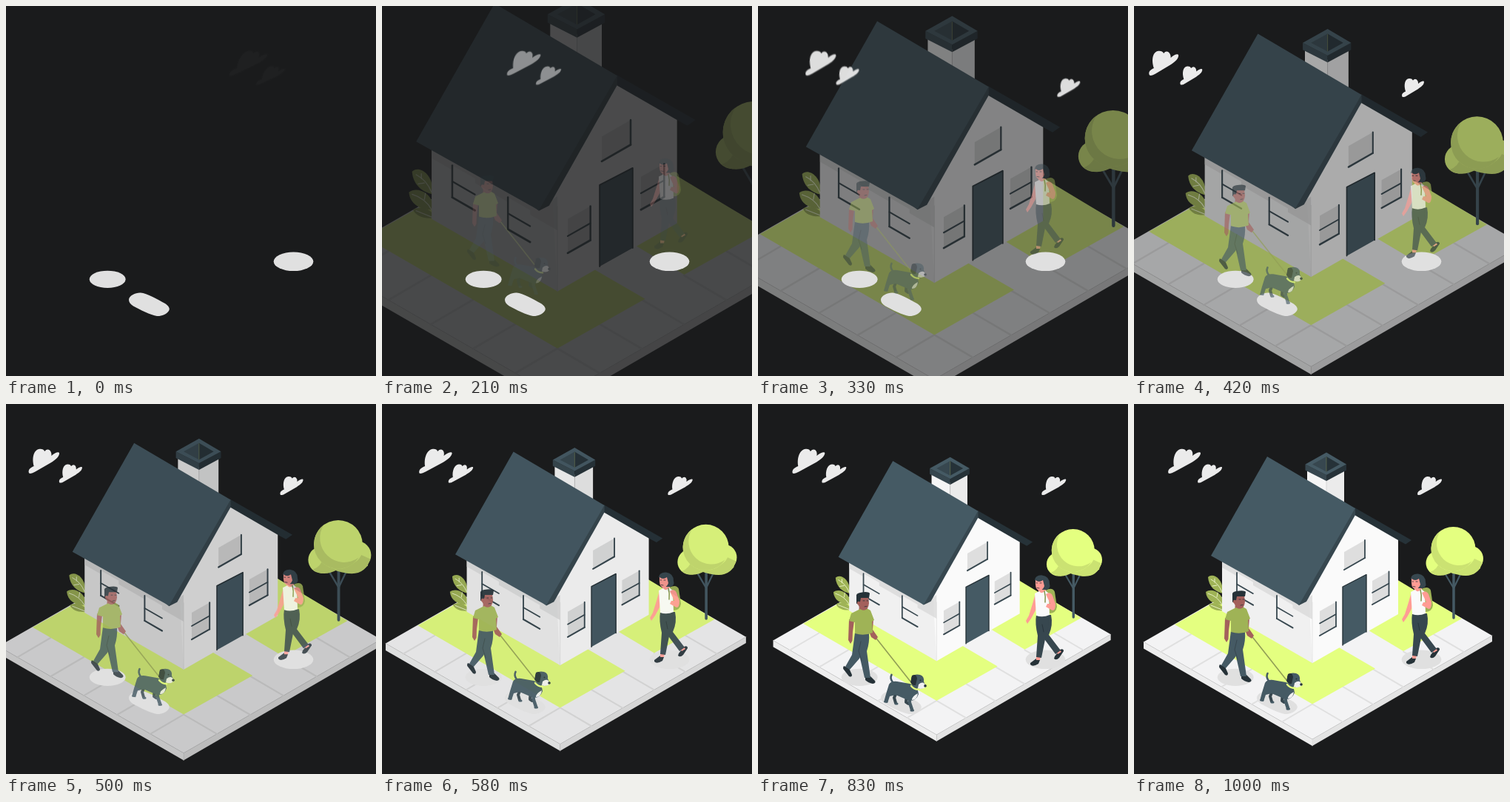
An HTML page for the animation above (1.04 s loop, 500x500 px).

```html
<!DOCTYPE html>
<html lang="en">
<head>
<meta charset="utf-8">
<title>Neighbourhood walk</title>
<style>
html, body { margin: 0; height: 100%; overflow: hidden; background: #1a1b1c; }
svg { display: block; width: 100vw; height: 100vh; }
.slate { fill: #455a64; } .deep { fill: #37474f; } .ink { fill: #263238; }
.lime { fill: #e4ff80; } .shade { fill: #cbe272; } .olive { fill: #9fb356; }
.wall { fill: #fafafa; } .side { fill: #f0f0f0; } .pane { fill: #e0e0e0; }
.tan { fill: #a3605c; } .pink { fill: #ff9c94; }
.line { fill: none; stroke-linecap: round; stroke-linejoin: round; }
</style>
</head>
<body>
<svg viewBox="0 0 500 500">
  <defs>
    <path id="cloud" fill="#ebebeb" d="M.5 33.500C-1 29 3 26 8 24C6 13 10 1.500 18 .8Q23 .3 24.500 4Q28 0 31.500 2.500Q34 5 33 10C38 6 44.500 3.500 44 7C43 12 37 16 31 19.500L9 31.500Q3 35 .5 33.500Z"/>
  </defs>

  <g id="scene">
    <!-- platform -->
    <path fill="#f3f3f4" d="M13 321.500L256 182 484 313 241 453Z"/>
    <path fill="#ededed" d="M13 321.500L241 453V462L13 330.500Z"/>
    <path fill="#e3e3e3" d="M484 313L241 453V462L484 321Z"/>
    <path class="line" stroke="#d8d8d8" stroke-width=".6" d="M13 321.500L241 453 484 313M241 453V462"/>
    <path id="joints" class="line" stroke="#e0e0e0" stroke-width="2"/>
    <path class="lime" d="M55 298L241 405.500 326 357.500 277 329 241 350 119 262Z"/>
    <path class="lime" d="M317 306L364 334 443 290 355 237Z"/>

    <!-- plant -->
    <g class="olive">
      <path d="M120 256C110 254 101 247 100 234C106 228 119 235 120 251Z"/>
      <path d="M120 271C107 271 98 265 97 254C105 248 118 255 120 265Z"/>
      <path d="M120 279C112 280 103 277 101 271C108 266 118 271 120 275Z"/>
    </g>
    <path class="line" stroke="#eef7cf" stroke-width=".9" d="M104 237Q114 242 119 254M100 256Q113 260 119 271M112 261L113 255M109 241V236M112 245L106 246M104 272L119 278"/>

    <!-- tree -->
    <path class="line" stroke="#455a64" stroke-width="3.500" d="M432 228V289"/>
    <path class="line" stroke="#455a64" stroke-width="2.200" d="M419 227L432 249 443 226"/>
    <circle class="lime" cx="411" cy="215" r="16.500"/>
    <path class="shade" d="M400 227Q410 224 414 211L432 226Q414 237 400 227Z"/>
    <path class="shade" d="M415 215L463 208Q470 214 468 222Q454 238 425 227Z"/>
    <circle class="lime" cx="455" cy="209" r="17"/>
    <path class="shade" d="M421 222Q452 226 460 209L471 214Q464 236 440 231Z"/>
    <circle class="lime" cx="431.500" cy="196" r="30"/>
    <path class="shade" d="M413.700 171.800A30 30 0 1 0 456.700 212.200A30 30 0 0 1 413.700 171.800Z"/>

    <!-- chimney -->
    <path fill="#f5f5f5" d="M234 87L260 101V122L234 107Z"/>
    <path fill="#ebebeb" d="M260 101L284 87V136L260 122Z"/>
    <path class="line" stroke="#c8c8c8" stroke-width=".6" d="M260 104V119"/>
    <path class="deep" d="M231.500 81.500L260 96V104L231.500 89.500Z"/>
    <path class="ink" d="M287 81.500L260 96V104L287 89.500Z"/>
    <path class="slate" d="M260 65.500L287 81.500 260 96 231.500 81.500Z"/>
    <path class="deep" d="M260 71L241 81.500 260 91.500Z"/>
    <path class="ink" d="M260 71L278 81.500 260 91.500Z"/>
    <path class="line" stroke="#7d8a55" stroke-width=".5" d="M260 72V91"/>

    <!-- house -->
    <path class="side" d="M119 206L241 262V350L119 280Z"/>
    <path class="wall" d="M241 350L357 284V180L299 145 236 255Z"/>
    <path fill="#d9d9d9" opacity=".75" d="M119 208L225 268 241 258V291L119 221Z"/>
    <g id="windows"></g>
    <path class="line" stroke="#d8d8d8" stroke-width=".6" d="M241 268V350"/>
    <path class="slate" d="M282 247L314 230V308L282 326Z"/>
    <path class="line" stroke="#263238" stroke-width="1.400" d="M282 326V247L314 230.500V308"/>
    <path class="ink" d="M298 140L375 184 367 189.500 357 184 298 150Z"/>
    <path class="deep" d="M299 141V150L233 267 223 272 218 268Z"/>
    <path class="slate" d="M180 71L299 141 223 271.500 104 205Z"/>
  </g>

  <!-- shadows -->
  <g class="pane">
    <ellipse cx="137.200" cy="369.300" rx="24.400" ry="11.600"/>
    <ellipse cx="388.500" cy="345.300" rx="26.800" ry="12.800"/>
    <path d="M166 397C166 391 176 387 182 387.500C190 388 206 397 214 401.500C220 405 222 409 220 412C217 417 209 419.500 204 419C196 418 180 410 172 405.500C168 403 166 400 166 397Z"/>
  </g>

  <g id="walkers">
    <path class="line" stroke="#919e55" stroke-width="1.600" d="M157 311L206 373"/>

    <!-- man -->
    <path class="tan" d="M137 268H147L148 281 136 282Z"/>
    <path class="tan" d="M123 289L130 291 128 306 127.500 318 125 322 122 317Z"/>
    <path class="tan" d="M149 287L156 288 155 303 162 313 159 317 153 313 149 303Z"/>
    <path class="ink" d="M116 352Q114 355 116 357L123 366Q127 368 127 364L123 355Z"/>
    <path class="ink" d="M145 366L152 366 158 372Q160 375 155 376 149 375 145 371Z"/>
    <path class="slate" d="M131 307L150 306 146 326 137 342 124 357 118 353 127 337Z"/>
    <path class="slate" d="M134 308H150Q151 320 147 332L152 368 144 368 136 333Z"/>
    <path class="line" stroke="#37474f" d="M139 319L136 332 140 345"/>
    <path class="olive" d="M132 278L138 275Q143 279 147 274L152 277 157 290 154 292 155 307Q143 312 131 308V293L123 291 126 281Z"/>
    <path class="tan" d="M135 260Q142 255 149 259L150 267Q149 276 144 276.500 138 275 135 269Z"/>
    <path class="ink" d="M133 268L133 258Q132 254 138 253 149 251 151 254L150 260 139 260 138 265Z"/>
    <circle class="tan" cx="136" cy="267" r="2.200"/>
    <path class="line" stroke="#263238" stroke-width=".8" d="M142 264H144M147 264H149M144 272L147 271.500"/>

    <!-- dog -->
    <path class="line" stroke="#37474f" stroke-width="4" d="M187 388L184 395 186 402M201 389L200 401 203 403"/>
    <path class="line" stroke="#455a64" stroke-width="2.600" d="M182 374Q178 369 180.500 364"/>
    <path class="slate" d="M177 377Q180 372 188 373L205 376 215 380 217 390Q214 399 205 399Q195 395 186 391L178 393 175 402 170 401 173 390Z"/>
    <path class="line" stroke="#455a64" stroke-width="4.500" d="M204 394L205 402 208 411"/>
    <path class="line" stroke="#455a64" stroke-width="3" d="M207 412H209.500M172 400H174M186 403H188"/>
    <path fill="#f0f0f0" d="M216 389Q215 398 208 398Q208 393 216 389Z"/>
    <path class="slate" d="M207 368Q211 362 219 364Q225 366 224 373L226 378 221 383 211 381Z"/>
    <path fill="#f0f0f0" d="M217 377Q222 373 225 376L227 380Q222 385 216 382Z"/>
    <path class="ink" d="M208 365Q214 362 215 369L213 378Q208 379 206 374Z"/>
    <circle class="ink" cx="226" cy="379" r="1.800"/>
    <circle class="ink" cx="219.500" cy="371.500" r="1"/>
    <path class="line" stroke="#e4ff80" stroke-width="2.400" d="M207 379Q211 384 217 384"/>

    <!-- woman -->
    <path class="pink" d="M375 254L379 261 375 277 369 288 364 295 362 291 366 284 371 268Z"/>
    <path class="ink" d="M368 348L376 342 381 344 379 349Q371 354 368 350Z"/>
    <path class="ink" d="M401 339L408 330Q413 328 413 332L407 341Q403 345 400 342Z"/>
    <path class="pink" d="M376 339H382L381 344H376ZM403 332L407 329 410 333 405 336Z"/>
    <path class="deep" d="M383 283H396Q399 297 393 310L409 331 402 336 385 313Z"/>
    <path class="deep" d="M376 283H392Q394 298 389 311L383 341 376 340 378 311Q374 295 376 283Z"/>
    <path class="line" stroke="#263238" stroke-width=".8" d="M384 296L386 306"/>
    <path class="olive" d="M388 250Q398 245 401 252L404 272Q403 281 393 281Z"/>
    <path class="pink" d="M379 244H388L390 256H379Z"/>
    <path class="wall" d="M374 254L380 251Q384 256 388 250L393 254 394 283Q385 287 376 284Z"/>
    <path class="pink" d="M389 255Q395 251 398 257L402 268Q402 277 398 277L389 272 391 268 395 268Z"/>
    <path class="line" stroke="#82934a" stroke-width="1.500" d="M387 251Q389 258 388 266"/>
    <path class="deep" d="M374 236Q375 229 384 229.500Q394 231 394 241Q396 247 390 249H384Z"/>
    <path class="pink" d="M375 236Q380 240 385 236L387 244Q385 250 379 250Q374 248 375 236Z"/>
    <path class="line" stroke="#263238" stroke-width=".8" d="M376 240H377.500M381 240H383M377 246.500L380 247"/>
  </g>

  <g id="clouds">
    <use href="#cloud" x="46" y="60"/>
    <use href="#cloud" transform="translate(86 81) scale(.75)"/>
    <use href="#cloud" transform="translate(383 97.500) scale(.75)"/>
  </g>
</svg>
<script>
const $ = id => document.getElementById(id);

// Pavement joints run outwards from the lawn edges.
let joints = '';
for (let i = 0; i < 5; i++) {
  for (const dir of [-1, 1]) {
    joints += `M${241 + dir * 41 * i} ${405.5 - 23.6 * i}l${dir * 41} 24`;
  }
}
$('joints').setAttribute('d', joints);

// Window: top-left corner, width, rise, height, x of the framed side, crossbar.
function addWindow(x, y, w, rise, h, frame, bar) {
  const sill = (dy, width) =>
    `<path d="M${x} ${y + dy}l${w} ${rise}" stroke-width="${width}"/>`;
  $('windows').innerHTML +=
    `<path fill="${rise > 0 ? '#f0f0f0' : '#dedede'}" d="M${x} ${y}l${w} ${rise}v${h}l${-w} ${-rise}z"/>
     <g class="line" stroke="#37474f">${sill(h, 2)}${bar ? sill(h / 2, 1.6) : ''}
     <path stroke-width="1.8" d="M${x + frame} ${y + frame / w * rise}v${h}"/></g>`;
}
addWindow(139, 228, 22, 12.7, 31, 0, true);
addWindow(193, 259, 21.5, 12.4, 31, 0, true);
addWindow(251, 280, 22, -12.5, 33, 22, true);
addWindow(322, 239, 22.5, -12.5, 32, 22.5, true);
addWindow(284, 200, 28, -16, 24, 28, false);

// cubic-bezier(.36, -.01, .5, 1.38): overshoots, then settles
function ease(x) {
  if (x <= 0) return 0;
  if (x >= 1) return 1;
  const curve = (u, a, b) => 3 * (1 - u) ** 2 * u * a + 3 * (1 - u) * u * u * b + u ** 3;
  let lo = 0, hi = 1;
  for (let i = 0; i < 24; i++) {
    const mid = (lo + hi) / 2;
    if (curve(mid, .36, .5) < x) lo = mid; else hi = mid;
  }
  return curve(lo, -.01, 1.38);
}

// Clouds rush in from the right: time, shift, skew, opacity
const rush = [
  [0, 212, -15.5, .02], [210, 112, -3.5, .53], [330, 37, 6, .93],
  [400, 0, 10, 1], [500, 0, 5.6, 1], [590, 0, -2, 1],
  [670, 0, -.2, 1], [1000, 0, 0, 1]
];
function cloudPose(t) {
  const i = rush.findIndex(key => key[0] > t);
  if (i < 0) return rush[rush.length - 1];
  const a = rush[i - 1], b = rush[i], f = (t - a[0]) / (b[0] - a[0]);
  return a.map((v, j) => v + (b[j] - v) * f);
}

function pose(el, transform, opacity) {
  el.setAttribute('transform', transform);
  el.setAttribute('opacity', Math.max(0, Math.min(1, opacity)));
}

const LOOP = 1040, FPS = 24, start = performance.now();
function draw() {
  const now = (performance.now() - start) % LOOP;
  const step = Math.floor((now + 6) * FPS / 1000);
  const t = step < 2 ? 0 : step * 1000 / FPS;
  const p = t ? ease((t + 34) / 1000) : 0;
  pose($('scene'), `translate(251 260) scale(${1.5 - .5 * p}) translate(-251 -260)`, p);
  pose($('walkers'), `translate(0 ${-30 * (1 - p)})`, p);
  const [, shift, skew, alpha] = cloudPose(t);
  pose($('clouds'), `translate(${shift} 250) skewX(${skew}) translate(0 -250)`, alpha);
  requestAnimationFrame(draw);
}
draw();
</script>
</body>
</html>
```
